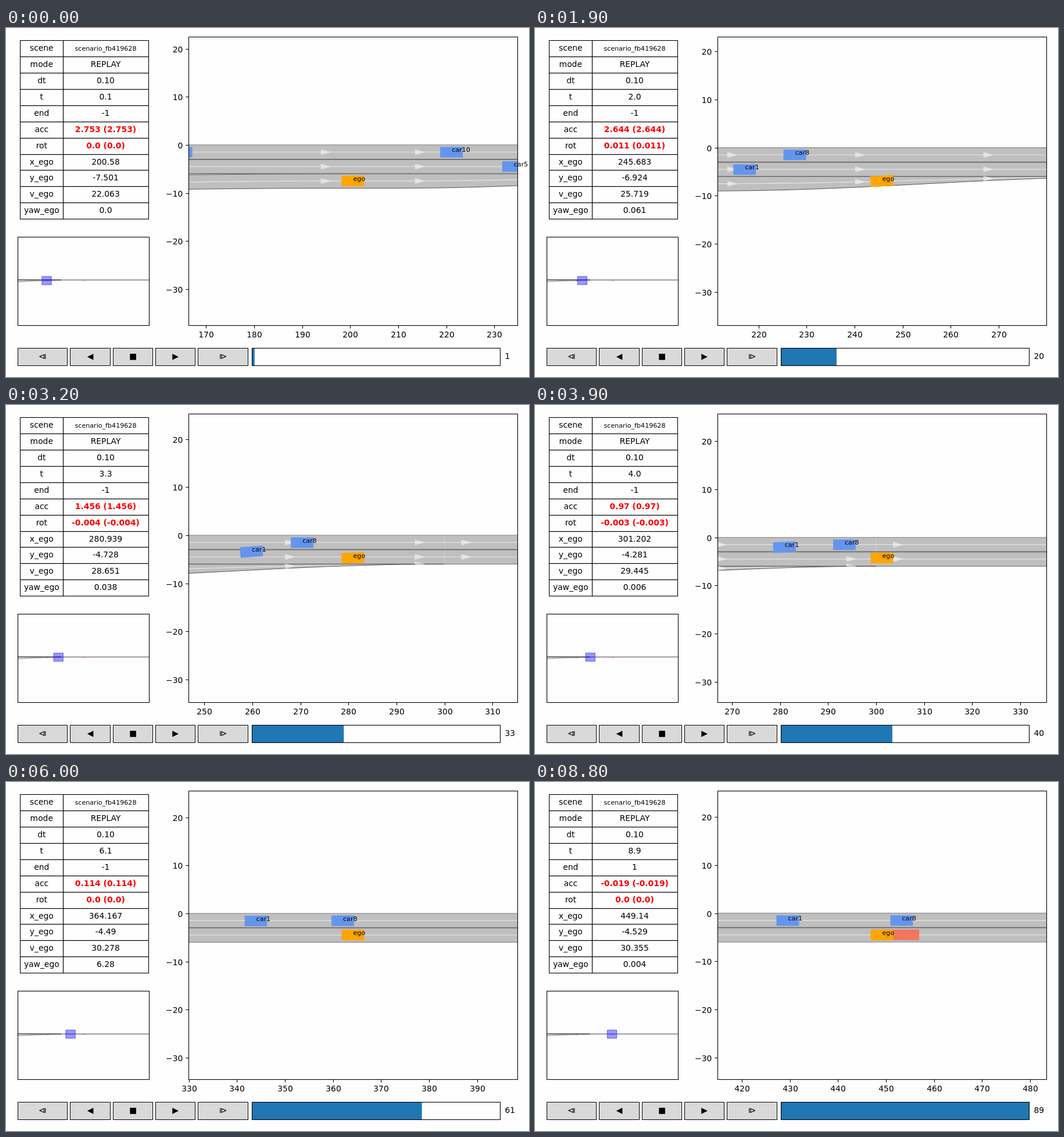
Write an HTML page that moves like this. It is 900 px wide and 600 px high and loops after 8.9 s.

```html
<!DOCTYPE html>
<html lang="en">
<head>
<meta charset="utf-8">
<title>Scenario replay</title>
<style>
  html, body { margin: 0; width: 100%; height: 100%; overflow: hidden; background: #fefefe; }
  svg { display: block; width: 900px; height: 600px; }
  text { font: 13.89px "DejaVu Sans", sans-serif; }
  .small { font-size: 11.11px; }
  .alert { font-weight: bold; fill: #f00; }
  .mid { text-anchor: middle; }
  .end { text-anchor: end; }
  .box { fill: none; stroke: #000; stroke-width: 1.1; }
  .button { fill: #d9d9d9; stroke: #000; }
  .edge { fill: none; vector-effect: non-scaling-stroke; }
</style>
</head>
<body>
<svg id="stage" viewBox="0 0 900 600">
  <defs>
    <clipPath id="plotClip"><rect x="314" y="15" width="566.5" height="496.5"/></clipPath>
    <clipPath id="mapClip"><rect x="20" y="359" width="226.5" height="152.5"/></clipPath>
  </defs>
  <g clip-path="url(#plotClip)"><g id="world"></g></g>
  <rect class="box" x="314.5" y="15.5" width="566" height="496"/>
  <g id="ticks"></g>
  <g id="labels"></g>
  <g id="table"></g>
  <g id="map" clip-path="url(#mapClip)"></g>
  <rect class="box" x="20.5" y="359.5" width="226" height="152"/>
  <g id="controls"></g>
</svg>
<script>
const SCALE = 496 / 60, CX = 597, CY = 263, HALF_W = 283 / SCALE;
const MAP_SCALE = 0.2514, FRAME_MS = 100, FRAMES = 89;
const $ = id => document.getElementById(id);

function add(parent, tag, attrs, text) {
  const el = document.createElementNS("http://www.w3.org/2000/svg", tag);
  set(el, attrs);
  if (text !== undefined) el.textContent = text;
  return parent.appendChild(el);
}
function set(el, attrs) {
  for (const key in attrs) el.setAttribute(key, attrs[key]);
}
const show = (el, on) => el.style.display = on ? "" : "none";

// Cubic Hermite through [time, value, slope] knots; returns [value, slope].
function hermite(knots, t) {
  let i = 0;
  while (i < knots.length - 2 && t > knots[i + 1][0]) i++;
  const [t0, a, da] = knots[i], [t1, b, db] = knots[i + 1];
  const h = t1 - t0, u = (t - t0) / h, d = (b - a) / h;
  const c2 = 3 * d - 2 * da - db, c3 = da + db - 2 * d;
  return [a + h * u * (da + u * (c2 + u * c3)), da + u * (2 * c2 + 3 * u * c3)];
}
// Fill in knot slopes from the neighbouring points.
function smooth(points) {
  const slope = (p, q) => (q[1] - p[1]) / (q[0] - p[0]);
  return points.map((p, i) => {
    const prev = points[i - 1], next = points[i + 1];
    if (!prev) return [...p, slope(p, next)];
    if (!next) return [...p, slope(prev, p)];
    return [...p, (slope(prev, p) + slope(p, next)) / 2];
  });
}

// time, x, y, speed, yaw, acceleration, steering
const egoLog = [
  [0.1, 200.58, -7.501, 22.063, 0, 2.753, 0],
  [2.0, 245.683, -6.924, 25.719, 0.061, 2.644, 0.011],
  [2.7, 264.167, -5.609, 27.461, 0.067, 2.626, -0.004],
  [4.0, 301.202, -4.281, 29.445, 0.006, 0.97, -0.003],
  [6.1, 364.167, -4.49, 30.278, -0.0032, 0.114, 0],
  [7.6, 409.663, -4.55, 30.369, 0, 0.015, 0],
  [8.9, 449.14, -4.529, 30.355, 0.004, -0.019, 0]
];
const egoX = egoLog.map(([t, x, , v]) => [t, x, v]);
const egoY = egoLog.map(([t, , y, v, yaw]) => [t, y, v * yaw]);
const egoV = egoLog.map(([t, , , v, , acc]) => [t, v, acc]);
const egoRot = egoLog.map(row => [row[0], row[6], 0]);

function egoAt(t) {
  const [v, acc] = hermite(egoV, t), [y, dy] = hermite(egoY, t);
  return { x: hermite(egoX, t)[0], y, v, acc, yaw: dy / v, rot: hermite(egoRot, t)[0] };
}

// time, x, y
const carLogs = {
  car10: [[0.1, 221.1, -1.51], [8.9, 511.5, -1.51]],
  car5: [[0.1, 234, -4.5], [8.9, 524.4, -4.5]],
  car8: [[0.1, 164.8, -1.5], [2, 227.54, -1.5], [2.7, 250.6, -1.53], [4, 293.4, -1.53],
         [6.1, 362.05, -1.53], [7.6, 411, -1.53], [8.9, 453.25, -1.53]],
  car1: [[0.1, 154, -4.5], [2, 217.1, -4.55], [2.7, 241.1, -4.5], [4, 280.9, -2.04],
         [4.6, 299, -1.62], [6.1, 343.97, -1.57], [7.6, 389.64, -1.54], [8.9, 429.54, -1.54]]
};

// Road
const world = $("world");
const rampDrop = x => x < 200 ? -0.0002 * (200 - x) ** 2 : 0;
const rampTop = x => -6 + rampDrop(x);
function rampBottom(x) {
  const s = Math.max(0, (x - 210) / 90);
  return -9 + rampDrop(x) + 1.5 * (1 - Math.cos(Math.PI * s));
}
const rampMid = x => (rampTop(x) + rampBottom(x)) / 2;

function trace(fn, from, to) {
  const points = [], step = from < to ? 2 : -2;
  for (let x = from; x !== to + step; x += step) points.push(x + "," + fn(x).toFixed(3));
  return points.join(" ");
}
function edge(points, color, width) {
  add(world, "polyline", { class: "edge", points, stroke: color, "stroke-width": width });
}
const level = (y, x0, x1) => `${x0},${y} ${x1},${y}`;

add(world, "rect", { x: 0, y: -6, width: 1000, height: 6, fill: "#bfbfbf" });
add(world, "polygon", {
  points: trace(rampTop, 0, 300) + " " + trace(rampBottom, 300, 0), fill: "#bfbfbf"
});
edge("300,0 300,-6", "rgba(255,255,255,.25)", 1);
for (const y of [-1.5, -4.5]) edge(level(y, 0, 1000), "rgba(255,255,255,.5)", 1.4);
edge(trace(rampMid, 0, 300), "rgba(255,255,255,.5)", 1.4);
edge(level(0, 0, 1000), "#959895", 1.4);
edge(level(-3, 0, 1000), "#696969", 1.8);
edge(level(-6, 0, 300), "#696969", 1.5);
edge(level(-6, 300, 1000), "#909090", 1.4);
edge(trace(rampTop, 0, 200), "#666", 1);
edge(trace(rampBottom, 0, 300), "#555", 1);

function arrow(x, y) {
  add(world, "path", { d: `M${x},${y - 0.62}v1.24l2.15,-.62z`, fill: "#fff", opacity: 0.5 });
}
for (const x of [193.9, 213.5, 240.1, 266.8, 293.8, 303.5]) {
  arrow(x, -1.5);
  arrow(x, -4.5);
  if (x < 300) arrow(x, rampMid(x + 1));
}

// Vehicles
add(world, "rect", { x: 447, y: -5.6, width: 9.9, height: 2.2, fill: "tomato", opacity: 0.8 });
function vehicle(name, color) {
  return {
    body: add(world, "rect", { x: -2.35, y: -1.1, width: 4.7, height: 2.2, fill: color }),
    label: add($("labels"), "text", { class: "small" }, name)
  };
}
function place({ body, label }, x, y, yaw, ego) {
  set(body, { transform: `translate(${x} ${y}) rotate(${yaw * 180 / Math.PI})` });
  set(label, { x: CX + 0.5 + (x - ego.x) * SCALE, y: CY + (ego.y - y) * SCALE });
  show(label, Math.abs(x - ego.x) < HALF_W);
}
const cars = Object.entries(carLogs).map(([name, log]) => ({
  ...vehicle(name, "#6495ed"),
  xs: smooth(log.map(([t, x]) => [t, x])),
  ys: smooth(log.map(([t, , y]) => [t, y]))
}));
const egoCar = vehicle("ego", "#ffa500");

// Axis ticks
function tick(value, line, label) {
  const g = add($("ticks"), "g", {});
  add(g, "path", { d: line, stroke: "#000", "stroke-width": 1.1 });
  add(g, "text", label, String(value).replace("-", "\u2212"));
  return { g, value };
}
const xTicks = [], yTicks = [];
for (let v = 160; v <= 490; v += 10)
  xTicks.push(tick(v, "M.5,511.5v5", { class: "mid", x: 0.5, y: 532 }));
for (let v = -30; v <= 20; v += 10)
  yTicks.push(tick(v, "M314.5,.5h-5", { class: "end", x: 304.3, y: 5.5 }));

// Status table
const table = $("table");
const rowNames = ["scene", "mode", "dt", "t", "end", "acc", "rot", "x_ego", "y_ego", "v_ego", "yaw_ego"];
const rowY = i => Math.round(21 + i * 27.93) + 0.5;
const cells = {};
rowNames.forEach((name, i) => {
  const y = rowY(i), base = Math.round(y + 17.4);
  for (const [x, w] of [[24.5, 74], [98.5, 147]])
    add(table, "rect", { class: "box", x, y, width: w, height: rowY(i + 1) - y, "stroke-width": 1.3 });
  add(table, "text", { class: "mid", x: 61.3, y: base }, name);
  const style = name === "scene" ? "mid small" : name === "acc" || name === "rot" ? "mid alert" : "mid";
  cells[name] = add(table, "text", { class: style, x: 171.5, y: base });
});
cells.scene.textContent = "scenario_fb419628";
cells.mode.textContent = "REPLAY";
cells.dt.textContent = "0.10";

// Overview map
const map = $("map");
const mapX = x => 70 + (x - 200.58) * MAP_SCALE, mapY = y => 432.4 - y * MAP_SCALE;
const mapLine = (d, stroke, width) => add(map, "path", { d, fill: "none", stroke, "stroke-width": width });
mapLine("M20,433.2H247", "#999", 1.9);
mapLine("M20,436.3Q46,434.4 71,434.2T95,433.5", "#999", 1.4);
mapLine("M20,432.9H95", "#555", 1.4);
mapLine("M70,434.3h3", "#555", 0.8);
mapLine("M132,433.7h3.5", "#f55", 1.4);
const view = add(map, "rect", {
  width: 2 * HALF_W * MAP_SCALE - 1, height: 60 * MAP_SCALE - 1,
  fill: "rgba(0,0,255,.4)", stroke: "rgba(0,0,255,.4)", "stroke-width": 1.4
});

// Player controls
const controls = $("controls");
for (const [x, w, glyph] of [[20, 85, "\u29CF"], [110, 69, "\u25C0"], [184, 68, "\u25A0"],
                             [257, 68, "\u25B6"], [330, 86, "\u29D0"]]) {
  add(controls, "rect", { class: "button", x: x + 0.5, y: 550.5, width: w, height: 30 });
  add(controls, "text", { class: "mid", x: x + 0.5 + w / 2, y: 569 }, glyph);
}
const progress = add(controls, "rect", { x: 423, y: 550.5, height: 30, fill: "#1f77b4" });
add(controls, "rect", { class: "box", x: 423.5, y: 550.5, width: 427, height: 30 });
const counter = add(controls, "text", { x: 858.5, y: 569 });

function fmt(value) {
  const s = String(+value.toFixed(3));
  return s.includes(".") ? s : s + ".0";
}
const twice = value => `${fmt(value)} (${fmt(value)})`;

function render(step) {
  const t = step / 10, ego = egoAt(t);
  set(world, { transform: `translate(${CX - ego.x * SCALE} ${CY + ego.y * SCALE}) scale(${SCALE} ${-SCALE})` });
  for (const car of cars) {
    const [x, vx] = hermite(car.xs, t), [y, vy] = hermite(car.ys, t);
    place(car, x, y, vy / vx, ego);
  }
  place(egoCar, ego.x, ego.y, ego.yaw, ego);

  for (const { g, value } of xTicks) {
    const dx = (value - ego.x) * SCALE;
    set(g, { transform: `translate(${Math.round(CX + dx)} 0)` });
    show(g, Math.abs(dx) <= 283.2);
  }
  for (const { g, value } of yTicks) {
    set(g, { transform: `translate(0 ${Math.round(CY + (ego.y - value) * SCALE)})` });
  }

  const values = {
    t: t.toFixed(1), end: step === FRAMES ? "1" : "-1",
    acc: twice(ego.acc), rot: twice(ego.rot),
    x_ego: fmt(ego.x), y_ego: fmt(ego.y), v_ego: fmt(ego.v),
    yaw_ego: fmt(ego.yaw < -0.0005 ? ego.yaw + 2 * Math.PI : ego.yaw)
  };
  for (const name in values) cells[name].textContent = values[name];

  set(view, {
    x: mapX(ego.x - HALF_W) + 0.5, y: mapY(ego.y + 30) + 0.5
  });
  set(progress, { width: 427 * step / FRAMES });
  counter.textContent = step;
}

let shown = 0;
function loop() {
  const step = Math.floor(performance.now() / FRAME_MS) % FRAMES + 1;
  if (step !== shown) render(shown = step);
  requestAnimationFrame(loop);
}
loop();
</script>
</body>
</html>
```
